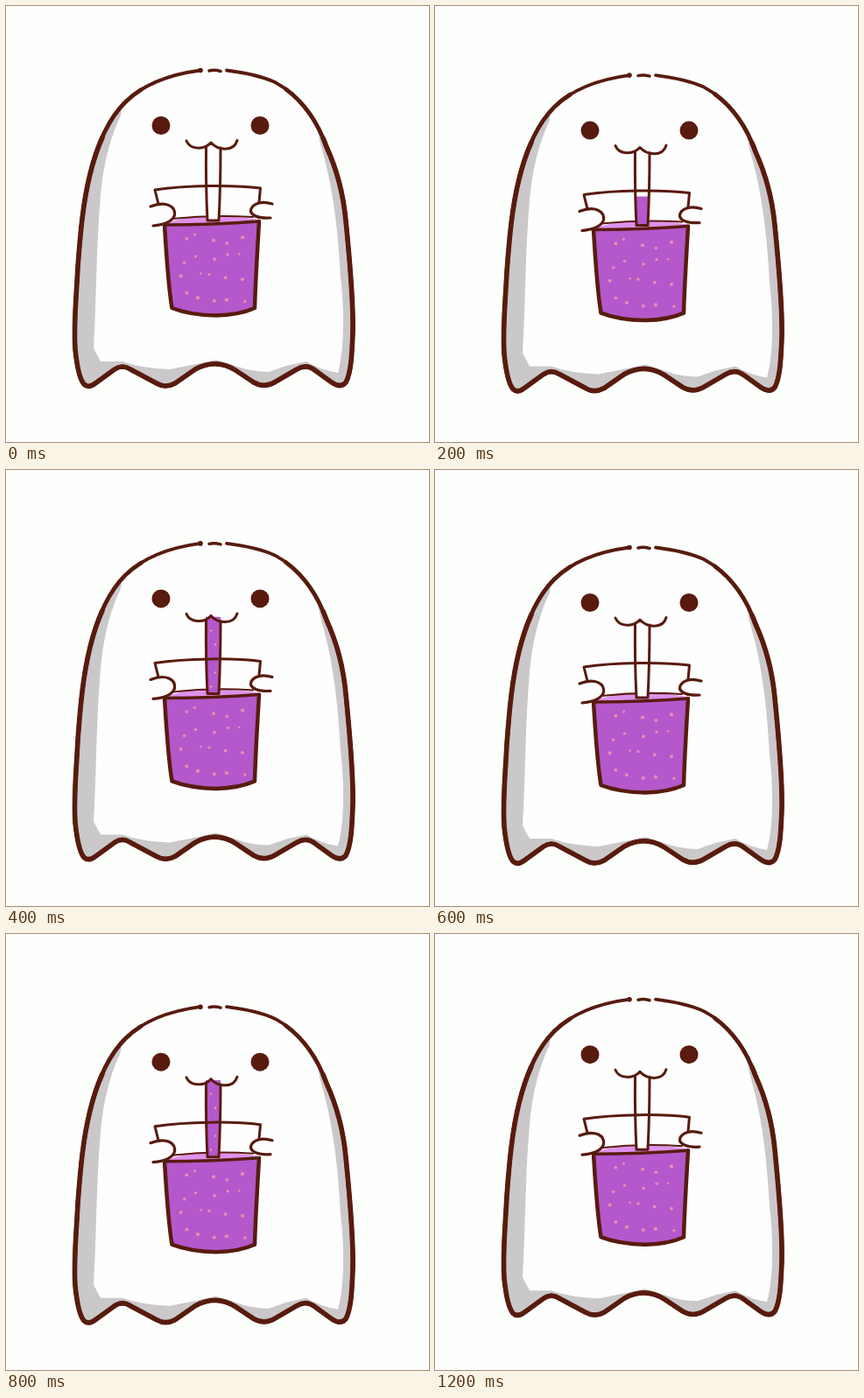
Animation of 483x498 px, one loop 1.3 s. Source, as an HTML page:

```html
<!DOCTYPE html>
<html lang="en">
<head>
<meta charset="utf-8">
<title>Sipping ghost</title>
<style>
  html, body { margin: 0; width: 100%; height: 100%; overflow: hidden; background: #fdfffc; }
  svg { display: block; }
  .line { fill: none; stroke: #581b0e; stroke-linecap: round; stroke-linejoin: round; }
  .ink { fill: #581b0e; }
  .pink { fill: #e38fb4; }
  .white { fill: #fefefe; }
</style>
</head>
<body>
<svg width="483" height="498" viewBox="0 0 483 498">
  <defs>
    <path id="outline" pathLength="100" d="M222 73.500C188 78 157 89 136 110C116 130 103 163 96 192C88 224 85 258 82 298C80 337 77 365 79 392C81 412 84 426 89 432
      Q94 437 102 431L124 415Q133 409 142 415L172 431Q182 437 193 431L216 415Q240 402 262 416L283 430Q295 437 308 429L332 415Q343 408 354 417L372 430Q382 437 388 430
      C394 419 395 399 396 373C397 336 392 285 388 245C385 213 377 185 366 161C355 130 335 102 307 87C289 79 272 76 252 73.500"/>
    <clipPath id="body"><use href="#outline"/></clipPath>
    <clipPath id="tube"><path d="M228 157H245L243 246H230Z"/></clipPath>
  </defs>
  <g id="ghost">
    <g clip-path="url(#body)">
      <path fill="#cac8c8" d="M70 60H410V450H70Z"/>
      <path class="white" d="M131 125C115 158 109 195 107 230C103 280 103 345 100 391L108 406H133Q155 414 187 415L217 409L240 404L262 411Q280 418 300 418L320 411L343 406Q360 416 379 419C386 395 387 350 382 310C379 250 372 200 359 158L340 60H140Z"/>
    </g>
    <!-- Layered strokes taper toward the top of the head. -->
    <g class="line">
      <use href="#outline" stroke-width="3.800"/>
      <use href="#outline" stroke-width="4.800" stroke-dasharray="0 6 88 6"/>
      <use href="#outline" stroke-width="5.600" stroke-dasharray="0 12 76 12"/>
      <path stroke-width="3.500" d="M232 74Q238 72.500 245 74.500"/>
    </g>
    <g class="ink">
      <circle cx="177" cy="136.500" r="10.500"/>
      <circle cx="290" cy="136.500" r="10.500"/>
    </g>

    <path fill="#de91ec" d="M184 248Q205 240 235 240T288 244L286 250H184Z"/>
    <path class="line" stroke-width="2" d="M190 243Q235 238 282 241"/>
    <path fill="#b458cb" d="M181 250Q235 250 289 246L284 345Q239 363 190 346Z"/>
    <g id="specks" class="pink"></g>

    <g clip-path="url(#tube)">
      <path class="white" d="M226 157H247V247H226Z"/>
      <rect id="juice" x="226" width="21" height="120" fill="#b458cb"/>
      <g id="bubbles" class="pink"></g>
    </g>
    <g class="line">
      <path stroke-width="3" d="M228.500 161Q228 205 230 245H243Q245 205 245 162"/>
      <path stroke-width="3" d="M206 154C210 164 226 165 234 156C242 165 260 167 264 153.500"/>
      <path stroke-width="3" d="M174 226L170 210Q196 206 232 205.500T290.500 208L289 224"/>
      <path stroke-width="3.500" d="M181 250Q235 250 289 246"/>
      <path stroke-width="4.500" d="M181 250C183 282 185 318 189.500 345Q210 353 240 353.500Q266 353 284 345C285 312 287 280 289 246"/>
    </g>
    <g class="line" stroke-width="3.200">
      <path class="white" d="M165 229C183 222 194 229 192.500 239Q189 249 168 251M304 226C287 221 279 229 279.500 235Q283 243 302 242"/>
    </g>
  </g>
</svg>
<script>
const $ = id => document.getElementById(id);
const noise = n => Math.abs(Math.sin(n * 12.9898) * 43758.5453) % 1;
const dot = (x, y, r) => `<circle cx="${x}" cy="${y}" r="${r}"/>`;
const dots = (count, place) => Array.from({ length: count }, (_, i) => dot(...place(i))).join('');

// Specks sit on a loose grid inside the cup.
$('specks').innerHTML = dots(20, i => [
  198 + i % 5 * 17 + noise(i + 1) * 9,
  260 + Math.floor(i / 5) * 22 + noise(i + 40) * 14,
  1.2 + noise(i + 80)
]);
$('bubbles').innerHTML = dots(5, i => [234 + i % 2 * 5, 173 + i * 16, 1.4]);

const steps = 13, turn = 6;

function draw(now) {
  const step = Math.floor(now / 100) % steps;
  const sinking = step <= turn;
  const depth = sinking ? (step / turn) ** 0.9 : ((steps - step) / (steps - turn)) ** 1.3;
  const sip = sinking ? step : 2 * turn - step;
  $('ghost').setAttribute('transform', `translate(0 ${15 * depth})`);
  $('juice').setAttribute('y', 250 - 10 * sip - 4.5 * sip * sip);
  $('bubbles').setAttribute('opacity', sip > 3 && sip < turn ? 1 : 0);
  requestAnimationFrame(draw);
}
draw(0);
</script>
</body>
</html>
```
